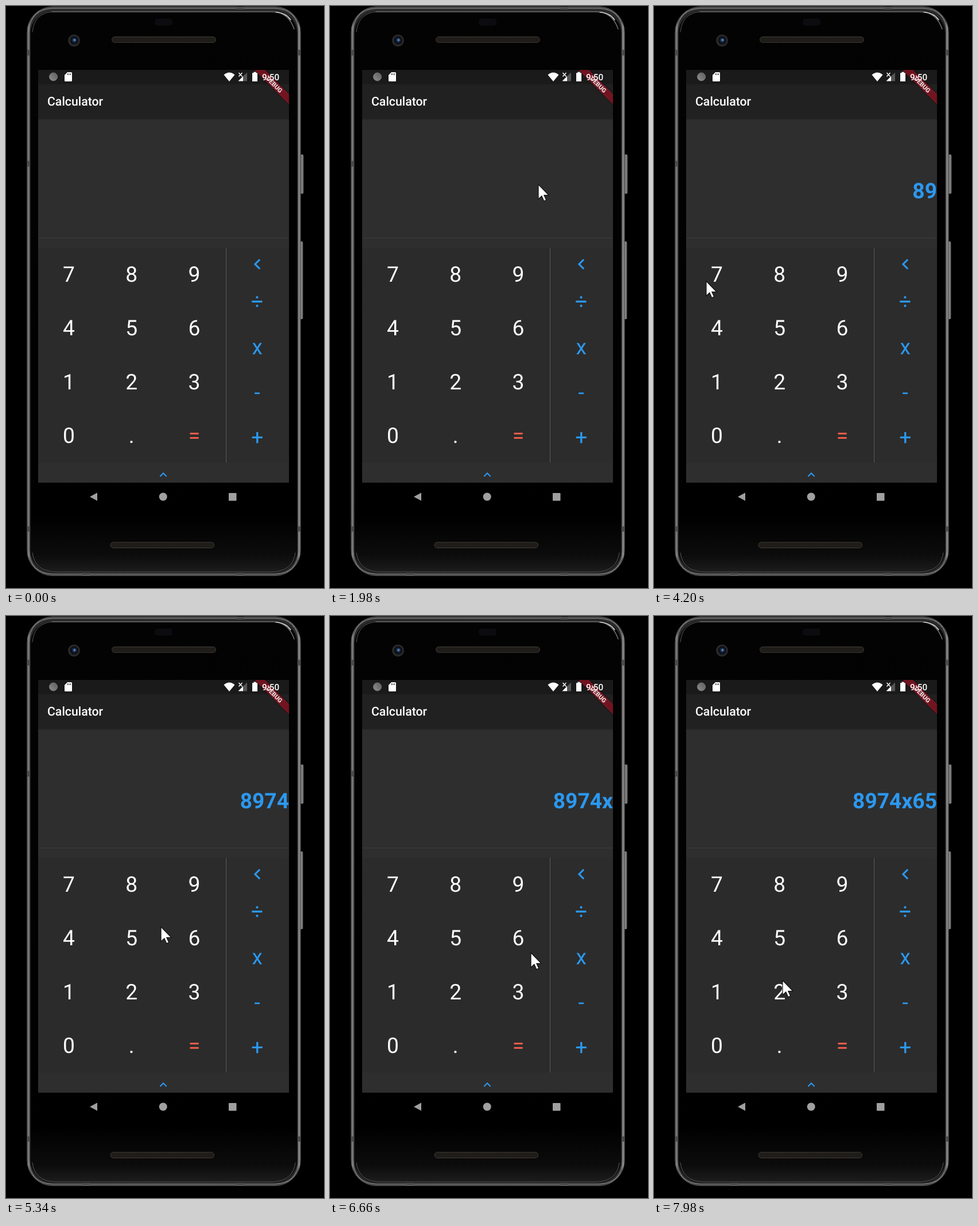
An HTML page for the animation above (8 s loop, 554x1011 px).

```html
<!DOCTYPE html>
<html lang="en">
<head>
<meta charset="utf-8">
<title>Calculator</title>
<style>
  html, body { margin: 0; width: 100%; height: 100%; overflow: hidden; background: #000; }
  svg { display: block; width: 554px; height: 1011px; font-family: Roboto, sans-serif; text-rendering: geometricPrecision; }
  .key { font-size: 37.2px; fill: #fff; text-anchor: middle; }
  .blue { fill: #2b98f0; }
  .red { fill: #f4604b; }
  #display { font-size: 37.2px; font-weight: 700; text-anchor: end; }
</style>
</head>
<body>
<svg viewBox="0 0 554 1011">
  <defs>
    <linearGradient id="rim" x2="1" y2="0">
      <stop offset="0" stop-color="#3c3c3c"/>
      <stop offset=".005" stop-color="#8a8a8a"/>
      <stop offset=".011" stop-color="#2a2a2a"/>
      <stop offset=".5" stop-color="#2c2c2c"/>
      <stop offset=".989" stop-color="#2a2a2a"/>
      <stop offset=".995" stop-color="#9a9a9a"/>
      <stop offset="1" stop-color="#444"/>
    </linearGradient>
    <linearGradient id="glass" x2="0" y2="1">
      <stop offset="0" stop-color="#030303"/>
      <stop offset=".9" stop-color="#000"/>
      <stop offset=".97" stop-color="#0c0c0c"/>
      <stop offset="1" stop-color="#1d1d1d"/>
    </linearGradient>
    <linearGradient id="side" x2="1" y2="0">
      <stop offset="0" stop-color="#333"/>
      <stop offset=".6" stop-color="#8c8c8c"/>
      <stop offset="1" stop-color="#555"/>
    </linearGradient>
    <linearGradient id="shade" x2="0" y2="1">
      <stop offset="0" stop-color="#000" stop-opacity=".3"/>
      <stop offset="1" stop-color="#000" stop-opacity="0"/>
    </linearGradient>
    <radialGradient id="lens" fx=".55" fy=".45">
      <stop offset="0" stop-color="#8fb4dc"/>
      <stop offset=".2" stop-color="#27446f"/>
      <stop offset=".45" stop-color="#0a1019"/>
      <stop offset=".65" stop-color="#101114"/>
      <stop offset=".75" stop-color="#2b2b2d"/>
      <stop offset="1" stop-color="#262628"/>
    </radialGradient>
    <linearGradient id="dot" x2="1" y2="0" y1="1">
      <stop offset="0" stop-color="#909090"/>
      <stop offset="1" stop-color="#5c5c5c"/>
    </linearGradient>
    <pattern id="mesh" width="3" height="3" patternUnits="userSpaceOnUse">
      <rect width="3" height="3" fill="#1a1815"/>
      <rect width="1.5" height="1.5" fill="#2d2a25"/>
    </pattern>
    <filter id="blur"><feGaussianBlur stdDeviation="3"/></filter>
    <clipPath id="screen"><rect x="56" y="111" width="437" height="717"/></clipPath>
    <clipPath id="cell"><rect id="cellBox"/></clipPath>
  </defs>

  <rect width="554" height="1011"/>

  <!-- body -->
  <g fill="url(#side)">
    <rect x="512" y="258" width="6.5" height="68" rx="2"/>
    <rect x="511" y="409" width="6.5" height="135" rx="2"/>
  </g>
  <rect x="37" y="1.5" width="476" height="988" rx="44" fill="url(#rim)" stroke="#6e6e6e"/>
  <rect x="43" y="9.500" width="464" height="974" rx="38" fill="url(#glass)" stroke="#0a0a0a"/>
  <g fill="none" stroke-linecap="round">
    <path d="M40 45Q42 5 82 4H468Q508 5 510 45M40 946Q42 986 82 987H468Q508 986 510 946" stroke="#7c7c7c" stroke-width="1.500"/>
    <path d="M80 10H465Q492 11 502 40" stroke="#757575" stroke-width="1.500"/>
    <path d="M470 10.500Q488 12 496 24" stroke="#d0d0d0" stroke-width="1.500"/>
    <path d="M46 45Q49 13 80 10M46 950Q50 981 84 983H466Q500 981 504 950" stroke="#585858"/>
  </g>
  <g fill="#4b4b4b">
    <path d="M37 76h5v10h-5zM508 76h5v10h-5zM37 269h5v10h-5zM37 904h5v9h-5zM508 904h5v9h-5z"/>
    <path d="M402 1h13v5h-13zM133 985h13v4h-13zM402 985h13v4h-13z"/>
  </g>
  <rect x="259" y="22" width="31" height="12" rx="5" fill="#0c0c10"/>
  <circle cx="118.500" cy="60" r="10.500" fill="url(#lens)"/>
  <g fill="url(#mesh)" stroke="#3d3934">
    <rect x="184.500" y="53.500" width="181" height="10" rx="5"/>
    <rect x="182" y="931.500" width="180.500" height="10" rx="5"/>
  </g>

  <!-- app -->
  <g clip-path="url(#screen)">
    <rect x="56" y="111" width="437" height="717" fill="#2e2e2e"/>
    <rect x="56" y="111" width="437" height="84" fill="#212121"/>
    <rect x="56" y="111" width="437" height="25" fill="#1a1a1a"/>
    <rect x="56" y="195" width="437" height="4" fill="url(#shade)"/>
    <rect x="56" y="402.500" width="437" height="1" fill="#3c3c3c"/>
    <rect x="56" y="420" width="327" height="373" fill="#2b2b2b"/>
    <rect x="384" y="420" width="109" height="373" fill="#2c2c2c"/>
    <rect x="383" y="420" width="1" height="373" fill="#5a5a5a"/>
    <text x="72" y="173.300" font-size="21.250" font-weight="500" fill="#fff">Calculator</text>

    <g transform="translate(493 111) rotate(45)">
      <rect x="-55" y="29.750" width="110" height="12.750" fill="#000" opacity=".5" filter="url(#blur)"/>
      <rect x="-45" y="29.750" width="90" height="12.750" fill="#a51629" fill-opacity=".65"/>
      <text y="40" font-size="10.840" font-weight="900" fill="#fff" fill-opacity=".85" text-anchor="middle">DEBUG</text>
    </g>

    <!-- status icons -->
    <circle cx="82.500" cy="123" r="7" fill="url(#dot)" stroke="#777"/>
    <g fill="#fff">
      <path d="M107 115h6.500q1.500 0 1.500 1.500v13q0 1.500-1.500 1.500h-10q-1.500 0-1.500-1.500V120z"/>
      <path d="M379.500 119.500Q389 111.500 398.500 119.500L389 131z"/>
      <path d="M413 122V130.500H404.500z"/>
      <path d="M413 122L420 115.500V130.500H413z" fill="#555"/>
      <path d="M431.500 114.500h4v1.800h2.500V131h-9v-14.700h2.500z"/>
      <text x="446" y="129" font-size="15.300" font-weight="500">9:50</text>
    </g>
    <path d="M405.500 116l6 6.500m0-6.500l-6 6.500" stroke="#fff" stroke-width="1.500"/>
    <path d="M107.500 117v3M110 117v3M112.500 117v3" stroke="#222"/>

    <g clip-path="url(#cell)">
      <g id="press" fill="#ccc">
        <rect x="56" y="420" width="437" height="373" opacity=".5"/>
        <circle id="ripple" opacity=".5"/>
      </g>
    </g>
    <g id="keys"></g>
    <g class="blue">
      <path transform="translate(437.900 448.500) scale(1.550)" d="M3.410-4.590L2-6L-4 0L2 6L3.410 4.590L-1.170 0z"/>
      <path transform="translate(274 814.300) scale(1.060)" d="M0-4L-6 2L-4.590 3.410L0-1.170L4.590 3.410L6 2z"/>
    </g>
    <text id="display" class="blue" x="493" y="334.200"></text>
  </g>

  <g fill="#a0a0a0">
    <path d="M146 852.500L159 845.500V859.500z"/>
    <circle cx="273.700" cy="852.500" r="7"/>
    <rect x="388" y="846" width="13.500" height="13.500" rx="1"/>
  </g>

  <path id="cursor" d="M0 0V25.500L5.800 20L9.700 28.700L13.700 27L9.900 18.500H18z" fill="#fff" stroke="#111" stroke-width="1.200"/>
</svg>
<script>
const LOOP = 8000, STEP = 60;
const $ = id => document.getElementById(id);
const clamp = v => Math.max(0, Math.min(1, v));
const set = (el, attrs) => { for (const k in attrs) el.setAttribute(k, attrs[k]); };

function addKey(label, x, y, cls = "") {
  const el = document.createElementNS("http://www.w3.org/2000/svg", "text");
  set(el, { x, y, class: "key " + cls });
  el.textContent = label;
  $("keys").append(el);
}
[..."7894561230.="].forEach((c, i) =>
  addKey(c, 109.5 + 109.25 * (i % 3), 479.2 + 93.25 * Math.floor(i / 3), c === "=" ? "red" : ""));
[..."÷x-+"].forEach((c, i) => addKey(c, 437.7, 526 + 78.8 * i, "blue"));

// time, label, cell column, cell top, cell height
const presses = [
  [2760, "8", 1, 420, 93], [3540, "9", 2, 420, 93], [4320, "7", 0, 420, 93],
  [4920, "4", 0, 513, 93], [5820, "x", 3, 556, 78], [6840, "6", 2, 513, 93],
  [7380, "5", 1, 513, 93]
];

// time, x, y of the pointer tip
const path = [
  [1440, 558, 330], [1900, 363, 310], [2100, 363, 310], [2640, 235, 466],
  [3240, 235, 466], [3480, 336, 470], [3720, 336, 470],
  [4140, 91, 478], [4440, 91, 478], [4800, 106, 562], [5040, 106, 562],
  [5340, 270, 540], [5700, 436, 592], [6120, 436, 592], [6600, 350, 585],
  [6720, 350, 585], [6800, 336, 570], [6960, 336, 570], [7260, 224, 562],
  [7560, 224, 562], [7900, 224, 633], [8000, 224, 633]
];

function pointer(t) {
  if (t < path[0][0]) return [600, 330];
  const i = path.findIndex(p => p[0] > t);
  const [t0, x0, y0] = path[i - 1], [t1, x1, y1] = path[i];
  const u = (t - t0) / (t1 - t0), e = u * u * (3 - 2 * u);
  return [x0 + (x1 - x0) * e, y0 + (y1 - y0) * e];
}

function draw(t) {
  const [x, y] = pointer(t);
  set($("cursor"), { transform: `translate(${x} ${y})` });

  const done = presses.filter(p => p[0] <= t);
  $("display").textContent = done.map(p => p[1]).join("");

  const last = done[done.length - 1];
  const age = last ? t - last[0] : 1e4;
  set($("press"), { opacity: 0.25 * clamp((age + 60) / 120) * clamp((400 - age) / 220) });
  if (!last) return;
  const [at, , col, top, height] = last, [cx, cy] = pointer(at);
  set($("cellBox"), { x: 56 + 109.25 * col, y: top, width: 109.25, height });
  set($("ripple"), { cx, cy, r: 15 + age * 0.25 });
}

let start;
function tick(now) {
  start ??= now;
  const t = (now - start) % LOOP;
  draw(Math.floor(t / STEP) * STEP);
  requestAnimationFrame(tick);
}
draw(0);
requestAnimationFrame(tick);
</script>
</body>
</html>
```
